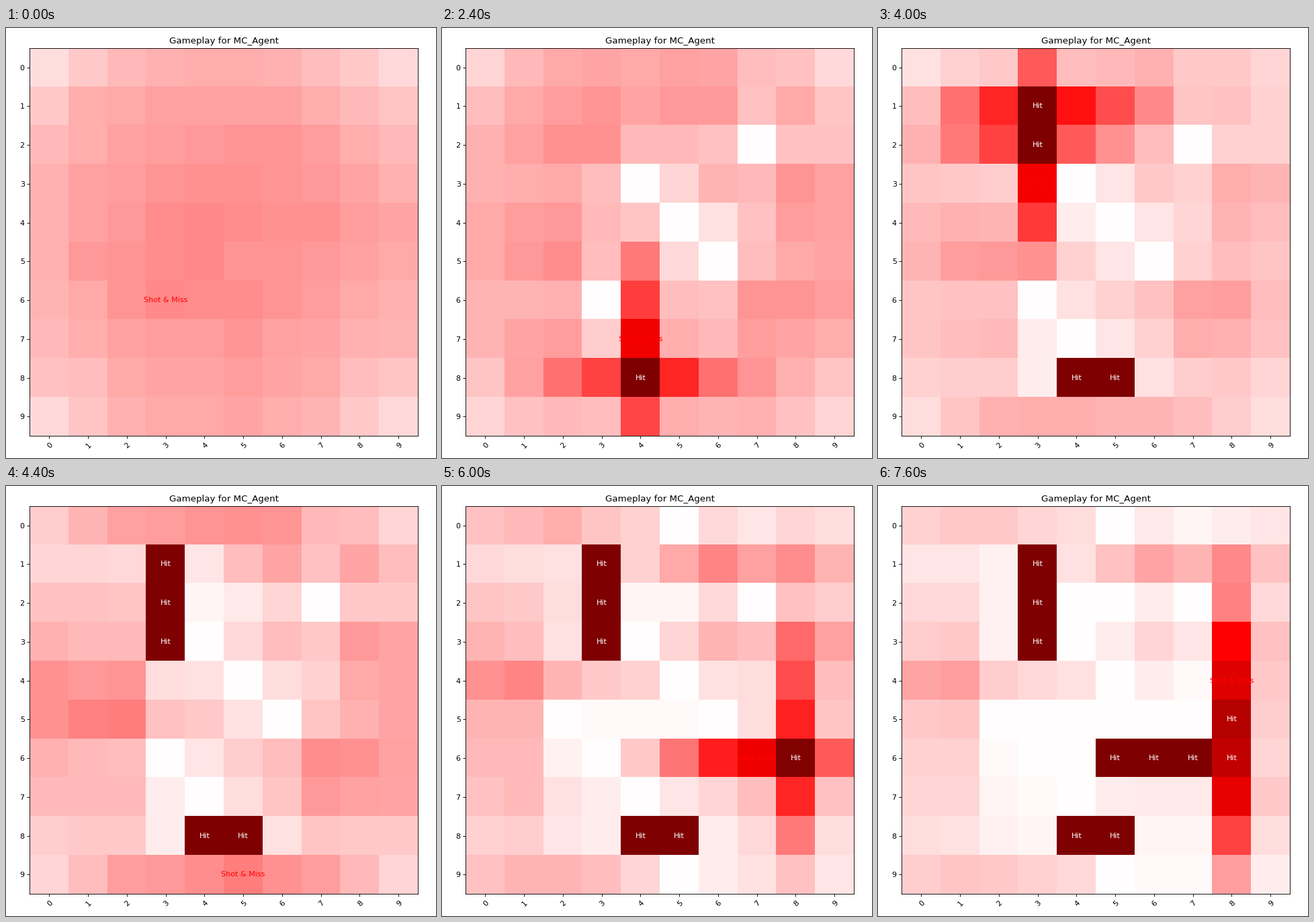
A matplotlib script for the animation above (8000 ms loop, 640 by 640 pixels).

```python
import random

import matplotlib.pyplot as plt
import numpy as np
from matplotlib.animation import FuncAnimation

SIZE, DPI, N = 640, 80, 10
INTERVAL = 400
BOARDS = 2500

# Cells are numbered row * 10 + column.
SHOTS = [63, 34, 45, 56, 27, 84, 74, 85, 23, 13,
         33, 95, 52, 5, 68, 67, 66, 65, 58, 48]
SHIPS = [range(84, 86), range(13, 34, 10), range(65, 68), range(58, 89, 10)]
HITS = {cell for ship in SHIPS for cell in ship}
FLEET = [5, 4, 3, 3, 2]


def mask_of(cells):
    return sum(1 << c for c in cells)


def placements(length, blocked):
    """Legal (mask, cells) pairs, split into horizontal and vertical."""
    across, down = [], []
    for line in range(N):
        for start in range(N - length + 1):
            span = range(start, start + length)
            across.append([line * N + k for k in span])
            down.append([k * N + line for k in span])
    return [[(mask_of(c), c) for c in group if not mask_of(c) & blocked]
            for group in (across, down)]


def pick(rng, pools, taken, need=0):
    """Choose a direction first, then a free placement covering `need`."""
    for pool in rng.sample(pools, 2):
        fits = [p for p in pool if not p[0] & taken and p[0] & need == need]
        if fits:
            return rng.choice(fits)
    return None


def sample_board(rng, ships, pools, open_hits):
    taken, cells = 0, []
    # With fewer ships afloat, fewer boards honour the open hits.
    focused = rng.random() < 1 - 0.25 ** (2 * len(ships) - 3)
    for length in rng.sample(ships, len(ships)):
        pending = [h for h in open_hits if not taken >> h & 1]
        choice = None
        if focused and pending:
            choice = pick(rng, pools[length], taken, 1 << rng.choice(pending))
        choice = choice or pick(rng, pools[length], taken)
        if choice:
            taken |= choice[0]
            cells += choice[1]
    return cells


def heat_map(turn):
    rng = random.Random(100 + turn)
    fired = SHOTS[:turn]
    afloat, sunk = list(FLEET), []
    for ship in SHIPS:
        if set(ship) <= set(fired):
            afloat.remove(len(ship))
            sunk += ship
    misses = [c for c in fired if c not in HITS]
    open_hits = [c for c in fired if c in HITS and c not in sunk]
    blocked = mask_of(misses + sunk)
    pools = {n: placements(n, blocked) for n in set(afloat)}

    heat = np.zeros(N * N)
    for _ in range(BOARDS):
        heat[sample_board(rng, afloat, pools, open_hits)] += 1 / BOARDS
    heat[sunk] = 1
    # The agent always fires at the warmest unknown cell.
    heat[SHOTS[turn]] = np.delete(heat, fired).max()
    return heat.reshape(N, N)


heats = [heat_map(turn) for turn in range(len(SHOTS))]

fig = plt.figure(figsize=(SIZE / DPI, SIZE / DPI), dpi=DPI)
left, top, side = 35.48, 29.75, 577.6
ax = fig.add_axes([left / SIZE, 1 - (top + side) / SIZE, side / SIZE, side / SIZE])
image = ax.imshow(heats[0], cmap="seismic", vmin=-1, vmax=1,
                  interpolation="nearest", aspect="auto")
ax.set_title("Gameplay for MC_Agent")
ax.set_xticks(range(N))
ax.set_yticks(range(N))
plt.setp(ax.get_xticklabels(), rotation=45, ha="right", rotation_mode="anchor")


def label(cell, text, color):
    row, col = divmod(cell, N)
    return ax.text(col, row, text, color=color, ha="center", va="center")


hit_labels = {turn: label(cell, "Hit", "w")
              for turn, cell in enumerate(SHOTS) if cell in HITS}
shot_label = label(SHOTS[0], "", "r")


def update(turn):
    image.set_data(heats[turn])
    for when, text in hit_labels.items():
        text.set_visible(when < turn)
    cell = SHOTS[turn]
    row, col = divmod(cell, N)
    shot_label.set_position((col, row))
    shot_label.set_text("Shot & Hit" if cell in HITS else "Shot & Miss")
    return [image, shot_label, *hit_labels.values()]


anim = FuncAnimation(fig, update, frames=len(SHOTS), interval=INTERVAL,
                     repeat=True, repeat_delay=0)
plt.show()
```
